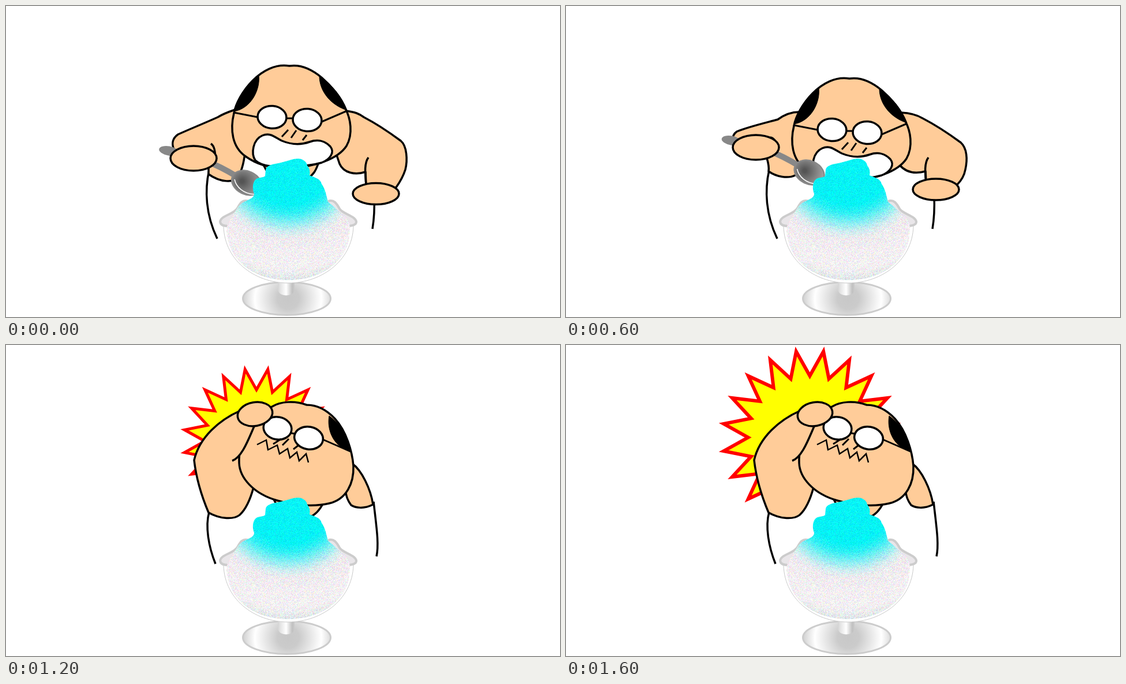
These frames come from a looping animation (960 px wide and 540 px high, 1680 ms). An HTML page with a canvas:

```html
<!DOCTYPE html>
<html lang="en">
<head>
<meta charset="utf-8">
<title>Shaved ice</title>
<style>
html, body { margin: 0; width: 100%; height: 100%; overflow: hidden; background: #fff; }
canvas { display: block; }
</style>
</head>
<body>
<canvas id="stage" width="960" height="540"></canvas>
<script>
const SKIN = '#fc9', TAU = Math.PI * 2;
const stage = document.getElementById('stage').getContext('2d');
let c = stage;

function shape(d, fill, stroke = '#000', width = 3.5) {
  const p = new Path2D(d);
  if (fill) { c.fillStyle = fill; c.fill(p); }
  if (stroke) { c.strokeStyle = stroke; c.lineWidth = width; c.stroke(p); }
}
const line = (d, width) => shape(d, null, '#000', width);

function oval(x, y, rx, ry, deg = 0, fill = SKIN, stroke = '#000', width = 3.5) {
  c.beginPath();
  c.ellipse(x, y, rx, ry, deg * Math.PI / 180, 0, TAU);
  c.fillStyle = fill;
  c.fill();
  if (stroke) { c.strokeStyle = stroke; c.lineWidth = width; c.stroke(); }
}

function stops(gradient, ...list) {
  list.forEach(([at, color]) => gradient.addColorStop(at, color));
  return gradient;
}

function layer(draw) {
  const el = document.createElement('canvas');
  el.width = 960;
  el.height = 540;
  const before = c;
  c = el.getContext('2d');
  draw();
  c = before;
  return el;
}

function drawIce() {
  // Syrup spreads in a circle from the peak
  const g = stops(c.createRadialGradient(489, 266, 0, 489, 266, 212),
    [0, '#00f6fa'], [.37, '#00f6fa'], [.45, '#38f2f8'], [.53, '#90eff5'], [.6, '#d4edf2'],
    [.66, '#f0ebf0'], [.78, '#f6f0f4'], [.9, '#f6f2f5'], [1, '#dce4e6']);
  shape('M450 284C452 277 460 275 472 273C486 270 496 265 507 265C516 266 521 271 522 277' +
    'C527 283 527 289 526 294C536 298 545 300 547 309C554 319 555 330 558 340' +
    'C566 346 572 352 577 357C588 364 595 372 596 384C598 440 550 476 489 476' +
    'C428 476 383 440 382 388C384 374 394 362 399 354C403 345 412 340 419 337' +
    'C426 334 430 331 430 326C427 319 427 309 431 303C436 296 446 299 449 295Z', g, null);
  // Seeded colour grain
  const img = c.getImageData(370, 260, 240, 220), px = img.data;
  let seed = 7;
  const rnd = () => (seed = (seed * 1664525 + 1013904223) >>> 0) / 2 ** 32;
  for (let i = 0; i < px.length; i++) {
    if (i % 4 < 3) px[i] += (rnd() - .5) * 60;
  }
  c.putImageData(img, 370, 260);
}
const ice = layer(drawIce);

const dessert = layer(() => {
  const base = stops(c.createRadialGradient(489, 508, 0, 489, 508, 78),
    [0, '#c8c8c8'], [.24, '#cbcbcb'], [.48, '#e4e4e4'], [.74, '#fff'], [1, '#d2d2d2']);
  oval(486.5, 508, 76, 28.5, 0, base, '#ccc', 3);
  const stem = stops(c.createLinearGradient(469, 0, 502, 0),
    [0, '#ccc'], [.2, '#e4e4e4'], [.5, '#fff'], [.82, '#c0c0c0'], [1, '#d0d0d0']);
  shape('M468 474H503V481H500V492C499 506 472 506 471 492V481H468Z', stem, null);
  shape('M377 376C375 440 430 481 489 481C548 481 604 440 602 376', '#fff', '#c8c8c8', 1);
  shape('M420 339C409 335 405 344 401 351C395 362 371 364 371 375C372 380 378 382 384 382', '#e9e6e9', '#ccc', 4);
  shape('M558 339C568 335 573 343 578 352C583 361 607 365 607 375C607 380 599 382 593 382', '#e9e6e9', '#ccc', 4);
  c.drawImage(ice, 0, 0);
});

function shifted(x, y, draw) {
  c.save();
  c.translate(x, y);
  draw();
  c.restore();
}

function spoon() {
  oval(282, 251.5, 17, 8, 10, '#888', null);
  shape('M285 251Q345 262 400 296', null, '#888', 10);
  const g = stops(c.createRadialGradient(409, 304, 3, 412, 305, 30),
    [0, '#555'], [.35, '#707070'], [1, '#a0a0a0']);
  oval(417, 307, 27, 20, 25, g, '#888', 2.5);
  shape('M396 301C399 315 412 326 430 327', null, '#fff', 1.5);
}

function eatingHead() {
  shape('M491 104C443 96 401 153 395 186C388 215 392 245 415 261C440 279 470 283 495 281' +
    'C535 279 575 266 590 243C602 222 597 195 588 178C570 140 530 98 491 104Z', SKIN);
  shape('M438 120C441 145 425 178 395 183C402 158 418 135 438 120Z', '#000', '#000', 1);
  shape('M543 121C543 150 565 173 591 181C582 157 565 137 543 121Z', '#000', '#000', 1);
  line('M395 185L436 193M486 195H497M547 201L591 182', 3);
  oval(461, 193, 25, 19.5, 5, '#fff');
  oval(522, 198, 25, 19.5, 5, '#fff');
  line('M489 215L478 227M503 216L494 229M521 224L514 233', 3);
  shape('M432 268C424 256 428 232 444 225C458 219 466 228 478 234C495 241 512 241 526 236' +
    'C540 231 553 234 562 244C570 254 562 266 547 272C530 277 515 277 495 278' +
    'C470 280 445 280 432 268Z', '#fff');
}

function eating(down) {
  line('M352 285C344 320 346 362 366 404M638 330C639 355 637 375 635 387');
  if (down) {
    shape('M404 184C390 184 378 189 367 197C345 203 315 210 296 218C290 222 288 227 290 234' +
      'L328 246L348 264C351 274 352 281 351 287C365 297 385 300 397 294C403 288 408 278 410 265', SKIN);
    shape('M580 185C600 186 610 190 618 195C645 209 665 223 684 237C695 247 696 266 692 284' +
      'C690 295 685 303 678 310L650 315L624 306L623 287C605 292 590 290 578 276', SKIN);
  } else {
    shape('M397 180C385 184 375 188 367 193C345 203 320 213 298 223C288 230 287 240 291 249' +
      'L325 264L351 282V292C372 307 395 307 402 297C409 286 412 272 414 256', SKIN);
    shape('M588 182C605 184 612 187 620 193C645 206 665 220 684 234C695 243 696 268 692 284' +
      'C688 297 683 305 676 315L650 322L624 312L623 288C605 294 585 290 578 274L572 256', SKIN);
  }
  line('M628 263C621 272 622 288 624 312');
  shape('M444 272L452 287L524 298C533 293 537 285 541 274', SKIN);
  shifted(0, down ? 22 : 0, eatingHead);
  shifted(down ? 4.5 : 0, down ? -18 : 0, () => {
    spoon();
    if (!down) line('M355 239C361 243 362 251 363 262');
  });
  if (down) line('M354 228C360 229 363 234 364 241');
  if (down) oval(329, 245.5, 40, 21.5);
  else oval(325, 264.5, 40, 21.5);
  oval(641, down ? 318.5 : 326, 40, 18.5);
}

function burst(x, y, scale) {
  c.save();
  c.translate(x, y);
  c.scale(scale, scale);
  c.beginPath();
  for (let i = 0; i < 40; i++) {
    const r = i % 2 ? 151 : 107, a = i * TAU / 40;
    c.lineTo(r * Math.sin(a), -r * Math.cos(a));
  }
  c.closePath();
  c.fillStyle = '#ff0';
  c.fill();
  c.strokeStyle = '#f00';
  c.lineWidth = 6;
  c.lineCap = 'butt';
  c.lineJoin = 'miter';
  c.stroke();
  c.restore();
}

function brainFreeze(big) {
  if (big) burst(422.5, 160.5, 1);
  else burst(434, 167, .835);
  // White shirt in front of the burst
  shape('M344 291H352L420 240H636L642 367L344 380Z', '#fff', null);
  line('M352 290C345 315 351 350 363 380');
  shape('M600 206C616 217 632 250 636 277C620 285 606 283 598 278C592 270 590 264 588 252', SKIN);
  line('M637 272C641 310 647 345 642 367');
  shape('M462 264L468 276L526 299C536 295 543 288 550 274', SKIN);
  shape('M406 114C370 130 335 160 326 200C330 235 340 265 351 291C372 303 395 303 405 295' +
    'C418 283 425 262 429 247', SKIN);
  shape('M521 104C500 96 475 98 461 107C430 125 402 165 404 205C405 230 428 258 470 270' +
    'C500 279 535 281 560 275C590 268 603 240 602 210C600 185 590 150 570 128' +
    'C555 112 540 104 521 104Z', SKIN);
  shape('M560 123C556 145 565 175 596 185C595 160 580 138 560 123Z', '#000', '#000', 1);
  // Forearm in front of the face
  shape('M406 118L440 120L431 141C420 165 408 197 393 201L380 150Z', SKIN, null);
  line('M431 139C420 164 409 195 392 201');
  line('M494 153L500 154M549 164L597 185', 3);
  oval(470.5, 144.5, 24.5, 19.5, 10, '#fff');
  oval(524.5, 161.5, 25, 19.5, 10, '#fff');
  line('M477 163L463 172M490 163L479 174M507 174L498 181', 3);
  c.lineJoin = 'miter';
  line('M435 173L451 165L454 182L470 174L474 189L488 180L492 196L504 186L508 201L520 189L524 204', 2.5);
  c.lineJoin = 'round';
  oval(431.5, 120, 30.5, 20.5, -10);
}

function frame(now) {
  const t = now % 1680;
  c.lineJoin = 'round';
  c.lineCap = 'butt';
  c.fillStyle = '#fff';
  c.fillRect(0, 0, 960, 540);
  if (t < 1200) eating(Math.floor(t / 200) % 2 === 1);
  else brainFreeze(Math.floor((t - 1200) / 80) % 2 === 1);
  c.drawImage(dessert, 0, 0);
  requestAnimationFrame(frame);
}
frame(0);
</script>
</body>
</html>
```
